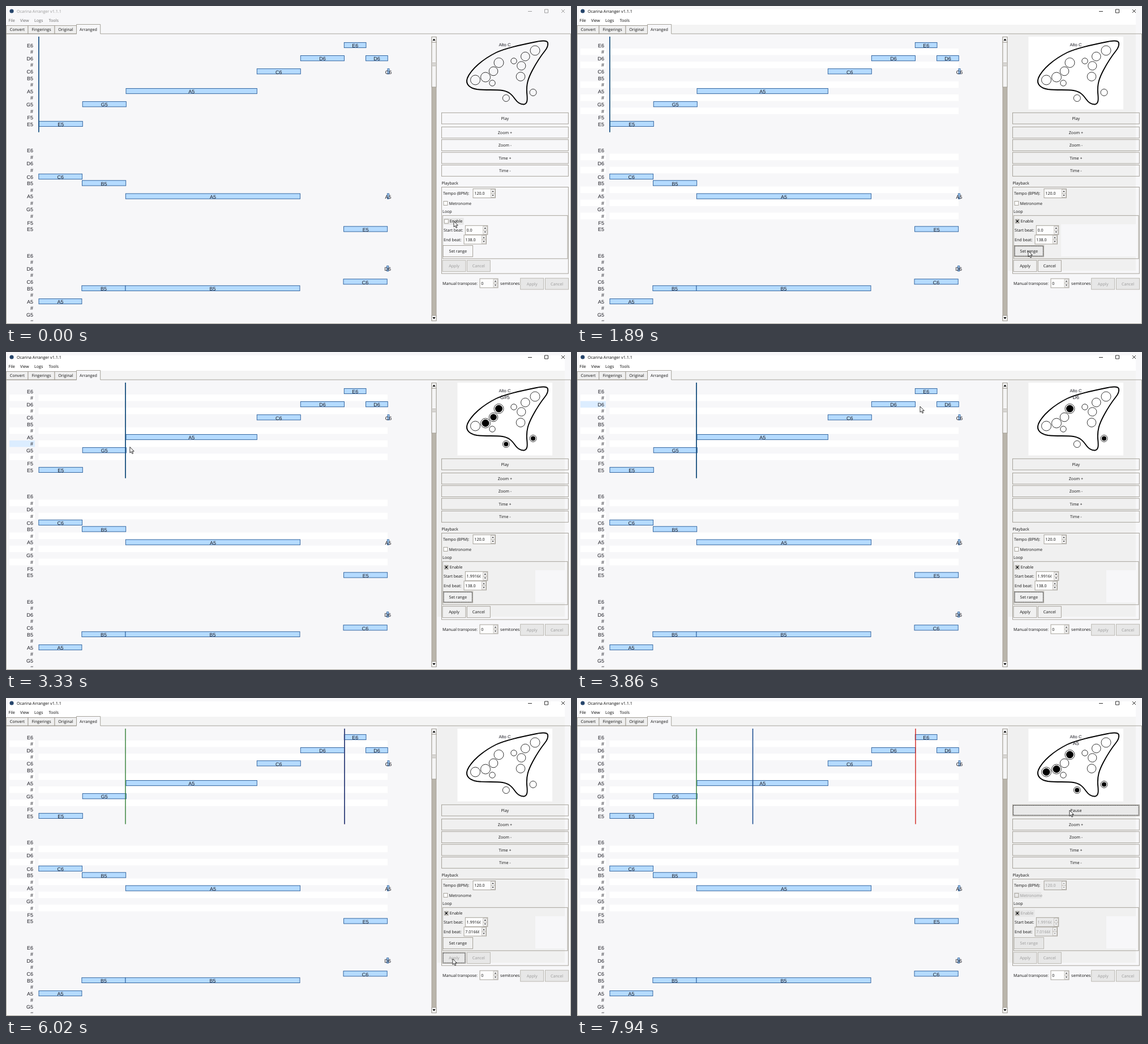
Write an HTML page that moves like this. It is 998x561 px and loops after 8000 ms.

```html
<!DOCTYPE html>
<html lang="en">
<head>
<meta charset="utf-8">
<title>Ocarina Arranger</title>
<style>
html, body { margin: 0; width: 100%; height: 100%; overflow: hidden; background: #f7f7f9; }
#stage { display: block; width: 100vw; height: 100vh; }
text { font-family: "Open Sans", sans-serif; font-size: 7.15px; fill: #111; text-rendering: geometricPrecision; }
.note { font-family: "Liberation Sans", Arial, sans-serif; font-size: 9px; fill: #1c1c24; }
.mid { text-anchor: middle; }
.end { text-anchor: end; }
.patch { display: none; }
.active .patch { display: inline; }
.caption { fill: #999; }
.menu { fill: #666; }
.active .caption, .active .menu { fill: #000; }
.controls { fill: none; stroke: #888; stroke-width: .8; }
.active .controls { stroke: #000; }
.edge { fill: none; stroke: #9e9a91; stroke-width: .9; }
.bar { fill: #b5dbff; stroke: #245a98; stroke-width: .9; }
.face { fill: transparent; stroke: #9e9a91; stroke-width: .9; }
.ring { fill: none; stroke: #000; stroke-width: 1; stroke-dasharray: 1.3 1.1; display: none; }
.hover .face { fill: #e9e9e9; }
.disabled .face { fill: #e7e7e7; stroke: #b5b2ab; }
.disabled text { fill: #999; }
.focus .ring { display: inline; }
.field { fill: #fdfdfd; stroke: #9e9a91; stroke-width: .9; }
.disabled .field { fill: #e9e9e9; }
.spin { fill: #f3f3f3; stroke: #aaa69e; stroke-width: .6; }
.arrow { fill: #333; }
.disabled .arrow { fill: #999; }
.back { fill: none; }
.hover .back, .disabled .back { fill: #e7e7e7; }
.hole { fill: none; stroke: #000; stroke-width: .8; }
</style>
</head>
<body>
<svg id="stage" viewBox="0 0 998 561" preserveAspectRatio="none"></svg>
<script>
const stage = document.getElementById('stage');
const $ = id => document.getElementById(id);

const rect = (x, y, x2, y2, attrs) =>
  `<rect x="${x}" y="${y}" width="${x2 - x}" height="${y2 - y}" ${attrs}/>`;
const text = (x, y, s, cls = '', id = '') =>
  `<text x="${x}" y="${y + 2.6}" class="${cls}" id="${id}">${s}</text>`;
const note = (x, y, s, cls) => `<text x="${x}" y="${y + 3.2}" class="note ${cls}">${s}</text>`;

// ---- piano roll ----
const rows = ['E6', 'D#6', 'D6', 'C#6', 'C6', 'B5', 'A#5', 'A5', 'G#5', 'G5', 'F#5', 'F5', 'E5'];
const ROW = 11.58, BLOCK = 185.5, TOP = 69.2, PATCH_END = 385;
const rowY = (block, i) => TOP + block * BLOCK + i * ROW;

// Each entry: pitch, left, right
const phrases = [
  [['E5', 58, 135.3], ['G5', 135.2, 212.3], ['A5', 212, 443.3], ['C6', 443.3, 520.3],
   ['D6', 520.3, 597.5], ['E6', 597.3, 636], ['D6', 635.6, 674.3], ['C6', 674, 677]],
  [['C6', 57.8, 134.6], ['B5', 134.5, 211.7], ['A5', 211.3, 519.6], ['E5', 596.6, 673.7], ['A5', 673.5, 676.5]],
  [['A5', 58, 133.9], ['B5', 133.9, 211], ['B5', 211, 519], ['C6', 596, 673.2], ['D6', 672.7, 675.7]]
];

function roll() {
  let stripes = '', labels = '', bars = '';
  phrases.forEach((phrase, b) => {
    rows.forEach((name, i) => {
      const y = rowY(b, i), sharp = name.includes('#');
      if (sharp && y < PATCH_END) {
        stripes += rect(6, y - ROW / 2, 51, y + ROW / 2, 'fill="#fff"') +
          rect(57.5, y - ROW / 2, 674, y + ROW / 2, 'fill="#fff"');
      }
      labels += note(48, y + .3, sharp ? '#' : name, 'end');
    });
    for (const [pitch, x, x2] of phrase) {
      const y = rowY(b, rows.indexOf(pitch));
      bars += rect(x, y - 4.8, x2, y + 4.4, 'class="bar"') + note((x + x2) / 2, y + .8, pitch, 'mid');
    }
  });
  return `<svg x="0" y="54" width="750" height="502" viewBox="0 54 750 502">
    <g class="patch">${stripes}</g>
    ${rect(6, 0, 51, ROW, 'id="cell" fill="#dcedff"')}
    ${labels}${bars}
    ${vline('loopStart', '#2e7d32', 1.4)}${vline('loopEnd', '#d0211c', 1.4)}${vline('playhead', '#1d4f91', 1.6)}
  </svg>`;
}
const vline = (id, color, w) => `<path id="${id}" d="M0 54V222.5" stroke="${color}" stroke-width="${w}"/>`;

function scrollbar() {
  const grip = [100.5, 103, 105.5].map(y => `M753 ${y}h6`).join('');
  return rect(752, 54.5, 760, 555.5, 'fill="#bab5ab" stroke="#9e9a91" stroke-width=".8"') +
    [[54.5, 64], [64, 143], [546, 555.5]].map(([a, b]) => rect(752, a, 760, b, 'class="edge" style="fill:#f5f5f5"')).join('') +
    `<path d="${grip}" stroke="#aaa69e" stroke-width="1.2"/>
     <path d="M753.5 61L756 57.5 758.5 61ZM753.5 549L756 552.5 758.5 549Z"/>`;
}

// ---- ocarina ----
const holes = [[870.5, 100, 8.5], [861, 115, 7.8], [847, 125.5, 8.5], [829, 130.5, 8.5], [883.3, 162.5, 6], [931, 152.5, 6],
  [909, 124.5, 7.8], [910.3, 105.5, 7.6], [917.3, 89, 7.8], [934.5, 78.5, 8.5], [897, 97, 5.2], [859, 136, 5.2]];
// Covered holes, as indexes into the list above
const fingering = {
  'E6': [5], 'D#6': [5], 'D6': [0, 5], 'C#6': [0, 1], 'C6': [0, 4, 5], 'B5': [0, 2, 4, 5], 'A#5': [0, 1, 2, 4, 5],
  'A5': [0, 2, 3, 4, 5], 'G#5': [0, 1, 2, 4, 5], 'G5': [0, 1, 2, 3, 4, 5], 'F#5': [0, 1, 2, 3, 4, 5, 7],
  'F5': [0, 1, 2, 3, 4, 5, 6], 'E5': [0, 1, 2, 3, 4, 5, 6, 7]
};

function ocarina() {
  const rings = holes.map(([x, y, r], i) =>
    `<circle class="hole" cx="${x}" cy="${y}" r="${r}"/><circle id="dot${i}" cx="${x}" cy="${y}" r="${r - 2}"/>`).join('');
  return `<path d="M957 65C956 60 945 61 932 64C908 69 884 74 866 82C842 94 822 111 815 127
    C811 138 819 145 832 147C850 149 862 147 877 149C889 151 894 157 899 164C904 171 909 174 915 173.5
    C922 172 921 163 920 153C919 138 922 128 930 113C938 98 944 89 952 79C956 74 958 70 957 65Z"
    fill="none" stroke="#000" stroke-width="1.9"/>${rings}
    <text class="note mid" x="881" y="70.8" style="font-size:7.7px">Alto C</text>
    <text class="note mid" x="881.3" y="82.5" id="fingered"></text>`;
}

// ---- controls ----
const buttons = {
  play: [769.5, 188.3, 993.3, 208, 'Play'],
  zoomIn: [769.5, 213.3, 993.3, 233, 'Zoom +'],
  zoomOut: [769.5, 235.7, 993.3, 255.4, 'Zoom -'],
  timeIn: [769.5, 258.2, 993.3, 277.9, 'Time +'],
  timeOut: [769.5, 280.6, 993.3, 300.3, 'Time -'],
  setRange: [772, 422.5, 824.5, 442.3, 'Set range'],
  apply: [771, 448.7, 812, 468.4, 'Apply'],
  cancel: [814.3, 448.7, 855.3, 468.4, 'Cancel'],
  apply2: [908.7, 480.2, 949.7, 500, 'Apply'],
  cancel2: [952.5, 480.2, 993.5, 500, 'Cancel']
};
const button = ([id, [x, y, x2, y2, label]]) => `<g id="${id}">${rect(x, y, x2, y2, 'class="face"')}
  ${rect(x + 1.2, y + 1.2, x2 - 1.2, y2 - 1.2, 'class="ring"')}
  ${text((x + x2) / 2, (y + y2) / 2, label, 'mid', id + 'Label')}</g>`;

function spinbox(id, x, y, w, value) {
  const r = x + w, m = y + 8, bx = r - 8;
  return `<g id="${id}">${rect(x, y, r, y + 16, 'class="field"')}
    <svg x="${x}" y="${y}" width="${w - 12.5}" height="16">${text(2.3, 8, value, '', id + 'Value')}</svg>
    ${rect(bx, y + 1, r - 1, m, 'class="spin"')}${rect(bx, m, r - 1, y + 15, 'class="spin"')}
    <path class="arrow" d="M${bx + 1.8} ${m - 2.4}l1.7 -2.4 1.7 2.4zM${bx + 1.8} ${m + 2.4}l1.7 2.4 1.7 -2.4z"/></g>`;
}

const checkbox = (id, x, y, label) => `<g id="${id}">
  ${rect(x - 1, y - 6, x + 8.5 + label.length * 4.3, y + 6, 'class="back"')}
  ${rect(x, y - 3.5, x + 7, y + 3.5, 'class="field"')}
  <path class="tick" d="M${x + 1.3} ${y - 2.2}l4.4 4.4m0 -4.4l-4.4 4.4" stroke="#000" stroke-width="1.4" visibility="hidden"/>
  ${text(x + 9.5, y, label)}</g>`;

function chrome() {
  const tabs = [[0.5, 39, 'Convert'], [39, 86, 'Fingerings'], [86, 124.5, 'Original']];
  const menus = [[4.5, 'File'], [25, 'View'], [50, 'Logs'], [75.5, 'Tools']];
  return `<g class="patch">
      ${rect(4, 6, 987, 33, 'fill="#fff"')}${rect(167, 33, 987, 49, 'fill="#f4f4f4"')}
      ${rect(762, 49, 987, 467, 'fill="#f0f0f0"')}${rect(797.5, 54, 965, 182.5, 'fill="#fff"')}
      ${rect(935, 385, 987, 442, 'id="pale" fill="#f7f7f9"')}
    </g>
    <circle cx="10" cy="9" r="3.6" fill="#26456b"/>
    ${text(19, 9.3, 'Ocarina Arranger v1.1.1', 'caption')}
    <path class="controls" d="M922 9.5h7M951.5 6h6v6h-6zM981 6l6 6m0 -6l-6 6"/>
    ${menus.map(([x, s]) => text(x, 25.6, s, 'menu')).join('')}
    ${tabs.map(([a, b, s]) => rect(a, 34.5, b, 49, 'class="edge" style="fill:#efefef"') + text((a + b) / 2, 41.8, s, 'mid')).join('')}
    <path class="edge" d="M.5 560.5V49H124.5V32.5H166.7V49H997.5V560.5Z"/>
    ${text(145.5, 41.8, 'Arranged', 'mid')}`;
}

stage.innerHTML = chrome() + roll() + scrollbar() + ocarina() +
  rect(769.5, 319.5, 993.3, 472, 'class="edge"') + rect(771.3, 369.7, 992, 445.8, 'class="edge"') +
  text(769.5, 312, 'Playback') + text(772, 330.2, 'Tempo (BPM):') + text(771, 362.3, 'Loop') +
  text(773, 395.3, 'Start beat:') + text(773, 412, 'End beat:') +
  text(771, 489.2, 'Manual transpose:') + text(873, 489.2, 'semitones') +
  checkbox('metronome', 773, 348, 'Metronome') + checkbox('enable', 774.3, 379.8, 'Enable') +
  spinbox('tempo', 825, 322.5, 39.5, '120.0') + spinbox('start', 811.3, 387.3, 39.5, '0.0') +
  spinbox('finish', 809, 404, 39.5, '138.0') + spinbox('semis', 837, 481, 32, '0') +
  Object.entries(buttons).map(button).join('') +
  `<path id="cursor" d="M0 0V10.3L2.4 8.2 4 12 5.7 11.2 4.1 7.6H7.3Z" fill="#fff" stroke="#000" stroke-width=".8"/>`;

// ---- timeline ----
const LOOP = 8000;
const at = { focus: 930, check: 1020, range: 1890, first: 2850, second: 4250, press: 5770, applied: 5920, play: 7240 };

// Pointer moves: frame step, then [time, x, y] stops
const moves = [
  [50, [1320, 791, 379.5], [1720, 797, 432]],
  [59, [1890, 797, 432], [2480, 251, 175], [2690, 213, 170]],
  [72, [2730, 213, 170], [3090, 211, 169]],
  [61, [3250, 211, 169], [3860, 606, 96], [4040, 598, 94]],
  [53.5, [4470, 598, 94], [5220, 785, 447]],
  [50, [5280, 785, 447], [5380, 789, 456]],
  [50, [5920, 789, 456], [6020, 789, 460]],
  [55, [6410, 789, 460], [7180, 870, 198]]
];
const easeInOut = p => p < .5 ? 2 * p * p : 1 - 2 * (1 - p) ** 2;
const easeOut = p => 1 - (1 - p) ** 2;

function pointer(t) {
  let [, x, y] = moves[0][1];
  for (const [step, ...stops] of moves) {
    const t0 = stops[0][0];
    if (t < t0) break;
    const held = t0 + Math.floor((t - t0) / step) * step;
    for (let i = 1; i < stops.length; i++) {
      const [a, ax, ay] = stops[i - 1], [b, bx, by] = stops[i];
      if (held < a) break;
      const p = t >= b ? 1 : (i > 1 ? easeOut : easeInOut)(Math.min(1, (held - a) / (b - a)));
      x = ax + (bx - ax) * p;
      y = ay + (by - ay) * p;
    }
  }
  return { x, y };
}

function hoveredRow({ x, y }) {
  if (x > 750) return null;
  for (let b = 0; b < 3; b++) {
    const i = Math.round((y - rowY(b, 0)) / ROW);
    if (i >= 0 && i < rows.length) return { name: rows[i], y: rowY(b, i) - ROW / 2 };
  }
  return null;
}

function playheadX(t) {
  if (t < at.first) return 57.8;
  if (t < at.second) return 211;
  if (t < at.play) return 598;
  if (t < 7360) return 212;
  return 213 + 9.75 * Math.floor((t - 7360) / 58);
}

const show = (id, on) => $(id).setAttribute('visibility', on ? 'visible' : 'hidden');
const moveX = (id, x) => $(id).setAttribute('transform', `translate(${x})`);
const toggle = (id, cls, on) => $(id).classList.toggle(cls, on);

function draw(t) {
  const mouse = pointer(t), row = hoveredRow(mouse), playing = t >= at.play;
  stage.classList.toggle('active', t >= at.focus);
  $('pale').setAttribute('x', t < 1949 ? 855 : 935);
  $('pale').setAttribute('width', t < 1949 ? 132 : 52);
  $('cursor').setAttribute('transform', `translate(${mouse.x} ${mouse.y})`);

  moveX('playhead', playheadX(t));
  moveX('loopStart', t < at.first ? 57.8 : 211);
  moveX('loopEnd', 598);
  show('loopEnd', t >= at.second);

  show('cell', row);
  if (row) $('cell').setAttribute('y', row.y);
  const pitch = playing ? 'A5' : row ? row.name : '';
  $('fingered').textContent = pitch;
  holes.forEach((_, i) => show('dot' + i, pitch && fingering[pitch].includes(i)));

  $('startValue').textContent = t < at.first ? '0.0' : '1.99166';
  $('finishValue').textContent = t < at.second ? '138.0' : '7.01666';
  $('playLabel').textContent = playing ? 'Pause' : 'Play';
  stage.querySelector('#enable .tick').setAttribute('visibility', t >= at.check ? 'visible' : 'hidden');

  const idle = t < at.check || t >= at.applied;
  const disabled = { apply: idle, cancel: idle, apply2: true, cancel2: true, setRange: playing };
  const focused = t < at.range ? '' : t < at.press ? 'setRange' : t < at.play ? 'apply' : 'play';
  for (const [id, [x, y, x2, y2]] of Object.entries(buttons)) {
    const over = mouse.x > x && mouse.x < x2 && mouse.y > y && mouse.y < y2 && t >= at.range;
    toggle(id, 'disabled', !!disabled[id]);
    toggle(id, 'hover', over && !disabled[id]);
    toggle(id, 'focus', id === focused);
  }
  for (const id of ['tempo', 'start', 'finish', 'metronome', 'enable']) toggle(id, 'disabled', playing);
  toggle('enable', 'hover', t < 1320);
}

function tick() {
  draw(performance.now() % LOOP);
  requestAnimationFrame(tick);
}
tick();
</script>
</body>
</html>
```
